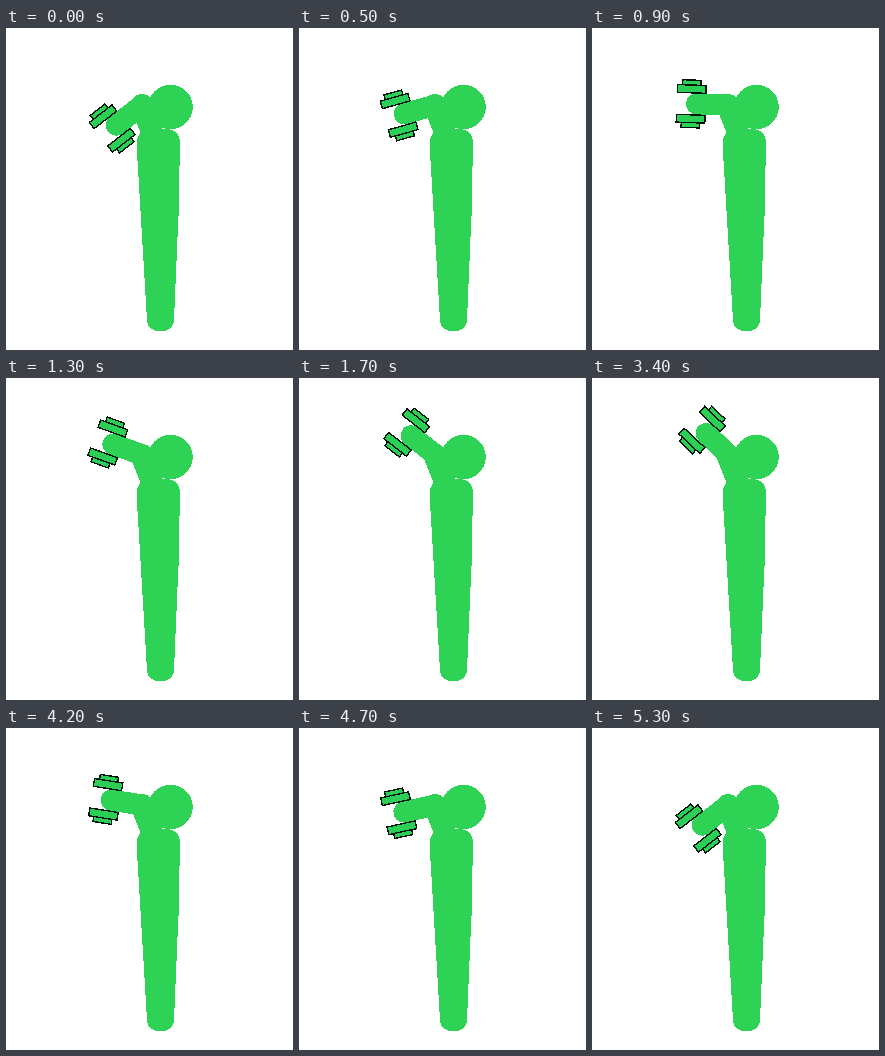
An HTML page for the animation above (6000 ms loop, 287 by 322 pixels).

```html
<!DOCTYPE html>
<html lang="en">
<head>
<meta charset="utf-8">
<title>Dumbbell curl</title>
<style>
  html, body { margin: 0; width: 100%; height: 100%; overflow: hidden; background: #fff; }
  svg { display: block; width: 287px; height: 322px; shape-rendering: crispEdges; }
  .skin { fill: #2ed356; }
  .limb { stroke: #2ed356; stroke-linecap: round; }
  .plate { fill: #2ccf55; stroke: #04140a; stroke-width: 1.4; }
</style>
</head>
<body>
<svg viewBox="0 0 287 322">
  <defs>
    <g id="plates" class="plate">
      <rect x="-9.2" y="-23.8" width="18.4" height="5"/>
      <rect x="-14.3" y="-18.8" width="28.6" height="7.8"/>
    </g>
  </defs>
  <g class="skin">
    <path d="M131 124V114A13 13 0 0 1 144 101H161A13 13 0 0 1 174 114L172.5 186L168 292A11 11 0 0 1 157 303H152A11 11 0 0 1 141 292Z"/>
    <ellipse cx="171.7" cy="184" rx="1.8" ry="4"/>
    <circle cx="164.5" cy="79" r="22.3"/>
  </g>
  <path class="limb" d="M136 77.5L145 100" stroke-width="23"/>
  <g id="forearm">
    <path class="limb" d="M0 -1.4H-32" stroke-width="21.2"/>
    <g transform="translate(-37.4 -1.3)">
      <use href="#plates"/>
      <use href="#plates" transform="scale(1 -1)"/>
    </g>
  </g>
</svg>
<script>
  const forearm = document.getElementById('forearm');
  const LOOP = 6000, STEP = 100;
  const LOW = -38, HIGH = 64.5;

  // Lift in 23 steps, hold, lower in 24 steps, hold.
  function angleAt(time) {
    const step = Math.floor(time / STEP);
    const lift = step < 30 ? Math.min(step / 23, 1) : 1 - Math.min((step - 29) / 24, 1);
    return LOW + (HIGH - LOW) * lift;
  }

  function draw() {
    const angle = angleAt(performance.now() % LOOP);
    forearm.setAttribute('transform', `translate(136.5 78.5) rotate(${angle})`);
    requestAnimationFrame(draw);
  }
  draw();
</script>
</body>
</html>
```
